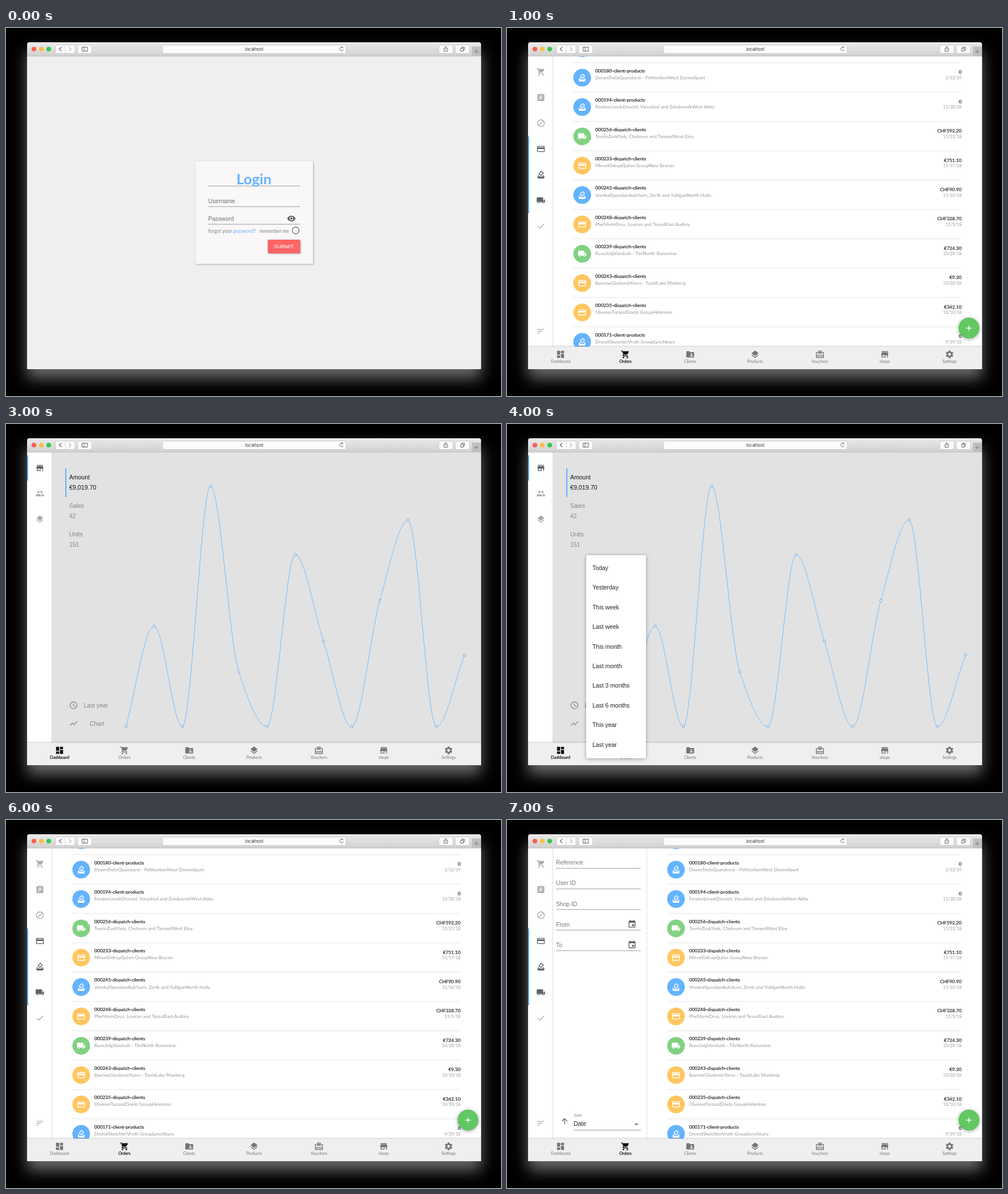
An HTML page for the animation above (8 s loop, 869x645 px).

```html
<!DOCTYPE html>
<html lang="en">
<head>
<meta charset="utf-8">
<title>Shop dashboard</title>
<style>
html, body { margin: 0; width: 100%; height: 100%; overflow: hidden; background: #000; }
#glow { position: absolute; left: 37px; top: 25px; width: 797px; height: 573px; border-radius: 4px 4px 1px 1px; box-shadow: 0 16px 26px rgba(255,255,255,.42); }
svg { position: absolute; left: 0; top: 0; }
text { font-family: "Liberation Sans", Arial, sans-serif; font-size: 10.4px; white-space: pre; }
.round { font-family: Lato, "Open Sans", sans-serif; }
.medium { stroke: currentColor; stroke-width: .2px; }
.ui { font-family: Inter, Roboto, sans-serif; }
.card { filter: drop-shadow(1px 1.5px 1.5px rgba(0,0,0,.3)); }
.panel { filter: drop-shadow(0 1.5px 3px rgba(0,0,0,.35)); }
.scene { visibility: hidden; animation: 8s step-end infinite; }
#login { animation-name: login; }
#orders { animation-name: orders; }
#pie { animation-name: pie; }
#chart { animation-name: chart; }
#menu { animation-name: menu; }
#shop { animation-name: shop; }
#filter { animation-name: filter; }
@keyframes login { 0% { visibility: visible } 12.5%, 100% { visibility: hidden } }
@keyframes orders { 0%, 25% { visibility: hidden } 12.5%, 75% { visibility: visible } 87.5%, 100% { visibility: hidden } }
@keyframes pie { 0% { visibility: hidden } 25% { visibility: visible } 37.5%, 100% { visibility: hidden } }
@keyframes chart { 0% { visibility: hidden } 37.5% { visibility: visible } 62.5%, 100% { visibility: hidden } }
@keyframes menu { 0% { visibility: hidden } 50% { visibility: visible } 62.5%, 100% { visibility: hidden } }
@keyframes shop { 0% { visibility: hidden } 62.5% { visibility: visible } 75%, 100% { visibility: hidden } }
@keyframes filter { 0% { visibility: hidden } 87.5%, 100% { visibility: visible } }
</style>
</head>
<body>
<div id="glow"></div>
<svg id="stage" width="100%" height="100%" viewBox="0 0 869 645"></svg>
<script>
const BLUE = '#64b3ff', GREEN = '#81d182', AMBER = '#ffc661';
const SHIFT = 165;

// Icons on a 24 unit grid: filled shapes and stroked lines
const solid = {
  store: 'M20 4H4v2h16zM21 14v-2l-1-5H4l-1 5v2h1v6h10v-6h4v6h2v-6zM12 18H6v-4h6z',
  people: 'M16 11a3 3 0 1 0-3-3 3 3 0 0 0 3 3zM8 11a3 3 0 1 0-3-3 3 3 0 0 0 3 3zM8 13c-2.3 0-7 1.2-7 3.5V19h14v-2.5C15 14.2 10.3 13 8 13zM16 13l-1 .1c1.2.8 2 1.9 2 3.4V19h6v-2.5c0-2.3-4.7-3.5-7-3.5z',
  layers: 'M12 18.5l-7.4-5.7L3 14.1l9 7 9-7-1.6-1.3zM12 16l9-7-9-7-9 7z',
  pie: 'M11 2v20a10 10 0 0 1 0-20zM13 2v9h9a10 10 0 0 0-9-9zM13 13v9a10 10 0 0 0 9-9z',
  dashboard: 'M3 13h8V3H3zM3 21h8v-6H3zM13 21h8V11h-8zM13 3v6h8V3z',
  cart: 'M7 18a2 2 0 1 0 .01 0zM17 18a2 2 0 1 0 .01 0zM1 2v2h2l3.6 7.6-1.4 2.4c-.7 1.3.3 3 1.8 3h12v-2H7.4c-.2 0-.3-.2-.2-.4l.9-1.6h7.5c.7 0 1.4-.4 1.7-1l3.6-6.5c.4-.7-.1-1.5-.9-1.5H5.2l-.9-2z',
  folder: 'M20 6h-8l-2-2H4a2 2 0 0 0-2 2v12a2 2 0 0 0 2 2h16a2 2 0 0 0 2-2V8a2 2 0 0 0-2-2zM15 9a2 2 0 1 1-.01 0zM19 17h-8v-1c0-1.3 2.7-2 4-2s4 .7 4 2z',
  clipboard: 'M19 3h-4.2a3 3 0 0 0-5.6 0H5a2 2 0 0 0-2 2v14a2 2 0 0 0 2 2h14a2 2 0 0 0 2-2V5a2 2 0 0 0-2-2zM12 3a1 1 0 1 1-.01 0zM14 17H7v-2h7zM17 13H7v-2h10zM17 9H7V7h10z',
  card: 'M20 4H4a2 2 0 0 0-2 2v12a2 2 0 0 0 2 2h16a2 2 0 0 0 2-2V6a2 2 0 0 0-2-2zM20 18H4v-6h16zM20 8H4V6h16z',
  vote: 'M18 13h-.7l-2 2h1.9l1.8 2H5l1.8-2h2l-2-2H6l-3 3v4a2 2 0 0 0 2 2h14a2 2 0 0 0 2-2v-4zM17 8l-5 4.9-3.5-3.5 5-5zM12.8 2.3L6.4 8.7a1 1 0 0 0 0 1.4l4.9 4.9a1 1 0 0 0 1.4 0l6.4-6.3a1 1 0 0 0 0-1.4l-5-5a1 1 0 0 0-1.3 0z',
  truck: 'M20 8h-3V4H3a2 2 0 0 0-2 2v11h2a3 3 0 0 0 6 0h6a3 3 0 0 0 6 0h2v-5zM6 15.5a1.5 1.5 0 1 1-.01 0zM19.5 9.5l2 2.5H17V9.5zM18 15.5a1.5 1.5 0 1 1-.01 0z',
  sort: 'M3 18h6v-2H3zM3 6v2h18V6zM3 13h12v-2H3z',
  date: 'M17 12h-5v5h5zM16 1v2H8V1H6v2H5a2 2 0 0 0-2 2v14a2 2 0 0 0 2 2h14a2 2 0 0 0 2-2V5a2 2 0 0 0-2-2h-1V1zM19 19H5V8h14z',
  eye: 'M12 4.5C7 4.5 2.7 7.6 1 12c1.7 4.4 6 7.5 11 7.5s9.3-3.1 11-7.5c-1.7-4.4-6-7.5-11-7.5zM12 7a5 5 0 1 1-.01 0zM12 9a3 3 0 1 0 .01 0z',
  gear: gear()
};
const lines = {
  clock: 'M12 3a9 9 0 1 0 .01 0M11.8 7v5.6l4.7 2.8',
  trend: 'M2.7 17.7l6.8-6.8 4 4 7.8-8.7',
  gift: 'M3 7h18v13H3zM3 15.7h18M12 7.5l4 4M12 7.5l-4 4M9.5 7A2 2 0 1 1 12 5a2 2 0 1 1 2.5 2',
  block: 'M12 3a9 9 0 1 0 .01 0M18 6L6 18',
  check: 'M4 12.7l5 5L20.3 6.3',
  up: 'M12 20V5M5 12l7-7 7 7',
  plus: 'M12 5v14M5 12h14'
};

function gear() {
  const pts = [];
  for (let i = 0; i < 6; i++)
    for (const [off, r] of [[-22, 7.3], [-13, 10], [13, 10], [22, 7.3]]) {
      const a = (i * 60 + off) * Math.PI / 180;
      pts.push((12 + r * Math.sin(a)).toFixed(2) + ' ' + (12 - r * Math.cos(a)).toFixed(2));
    }
  return 'M' + pts.join('L') + 'zM12 8.5a3.5 3.5 0 1 0 .01 0z';
}

const rect = (x, y, w, h, fill, more = '') => `<rect x="${x}" y="${y}" width="${w}" height="${h}" fill="${fill}" ${more}/>`;
const disc = (x, y, r, fill, more = '') => `<circle cx="${x}" cy="${y}" r="${r}" fill="${fill}" ${more}/>`;
const path = (d, stroke, width = 1, more = '') => `<path d="${d}" fill="none" stroke="${stroke}" stroke-width="${width}" ${more}/>`;
const rule = (x1, x2, y, color = '#9b9b9b') => path(`M${x1} ${y}H${x2}`, color);
const group = (x, body) => `<g transform="translate(${x})">${body}</g>`;
const scene = (id, body) => `<g id="${id}" class="scene" clip-path="url(#page)">${body}</g>`;

function text(x, y, str, fill, { size = 10.4, cls = '', anchor = 'start', weight = 400 } = {}) {
  return `<text x="${x}" y="${y}" fill="${fill}" color="${fill}" class="${cls}" text-anchor="${anchor}" style="font-size:${size}px;font-weight:${weight}">${str}</text>`;
}

function icon(name, x, y, color, size = 16) {
  const k = size / 24;
  const body = solid[name]
    ? `<path d="${solid[name]}" fill="${color}" fill-rule="evenodd"/>`
    : path(lines[name], color, 2);
  return `<g transform="translate(${x - size / 2} ${y - size / 2}) scale(${k})">${body}</g>`;
}

function nav(active) {
  const items = [['dashboard', 'Dashboard'], ['cart', 'Orders'], ['folder', 'Clients'], ['layers', 'Products'],
    ['gift', 'Vouchers'], ['store', 'shops'], ['gear', 'Settings']];
  return rect(37, 556, 797, 3, 'url(#edge)') + rect(37, 558.5, 797, 40, '#efefef') +
    items.map(([name, label], i) => {
      const x = 94 + i * 113.83, on = i === active, color = on ? '#111' : '#757575';
      return icon(name, x, 572, color, 16.5) +
        text(x, 586.6, label, color, { size: 7.1, cls: on ? 'round medium' : 'round', anchor: 'middle' });
    }).join('');
}

function sidebar(icons, activeFrom, activeTo, barY, barH) {
  return rect(37, 49, 43.5, 510, '#fff') + rect(80, 49, 1, 510, '#dedede') + rect(37, barY, 2, barH, BLUE) +
    icons.map((n, i) => icon(n, 59.5, 77 + i * 45, i >= activeFrom && i <= activeTo ? '#606060' : '#acacac')).join('');
}

// Monotone cubic through evenly spaced values; heights rise from the base line
function curve(x0, heights) {
  const n = heights.length, step = (805 - x0) / (n - 1);
  const pts = heights.map((h, i) => [x0 + i * step, 530.3 - h]);
  const d = pts.slice(1).map((p, i) => p[1] - pts[i][1]);
  const m = pts.map((_, i) => {
    if (i === 0) return d[0];
    if (i === n - 1) return d[n - 2];
    const a = d[i - 1], b = d[i];
    return a * b <= 0 ? 0 : 2 * a * b / (a + b);
  });
  let p = 'M' + pts[0];
  for (let i = 1; i < n; i++) {
    const [xa, ya] = pts[i - 1], [xb, yb] = pts[i];
    p += `C${xa + step / 3} ${ya + m[i - 1] / 3} ${xb - step / 3} ${yb - m[i] / 3} ${xb} ${yb}`;
  }
  return path(p, '#7abcfb') + pts.map(([x, y]) => disc(x, y, 2, '#fff', 'stroke="#559fe3"')).join('');
}

const months = [0, 176, 0, 421.5, 96, 0, 301, 149.5, 0, 221, 362, 0, 125.5];
const shopMonths = [0, 0, 0, 148, 26, 0, 311, 274, 0, 402, 347, 0, 0];

function pieChart(values, cx, cy, r) {
  const sum = values.reduce((a, b) => a + b);
  let angle = 0, spokes = '';
  for (const v of values.filter(Boolean)) {
    spokes += `M${cx} ${cy}L${cx + r * Math.cos(angle)} ${cy + r * Math.sin(angle)}`;
    angle -= v / sum * 2 * Math.PI;
  }
  return disc(cx, cy, r, BLUE, 'stroke="#fff"') + path(spokes, '#fff');
}

function stats(amount, sales, units, kind) {
  const grey = '#858585';
  return rect(104, 78, 2, 50, BLUE) +
    text(111, 97, 'Amount', '#161616') + text(111, 115, amount, '#161616', { size: 10.7 }) +
    text(111, 147, 'Sales', grey) + text(111, 165, sales, grey) +
    text(111, 197, 'Units', grey) + text(111, 215, units, grey) +
    icon('clock', 118.5, 493, '#8f8f8f') + text(136.5, 496.5, 'Last year', grey) +
    icon(kind === 'Pie' ? 'pie' : 'trend', 118.5, 525, '#8f8f8f') + text(147, 528.5, kind, grey);
}

const dashboard = body => rect(37, 49, 797, 549, '#e2e2e2') +
  sidebar(['store', 'people', 'layers'], 0, 0, 55, 44) + body + nav(0);

const tooltip = `<g class="panel">${rect(560, 389, 60.5, 33, '#fff', 'rx="2"')}</g>` +
  text(565, 403, 'November', BLUE, { size: 10.5, cls: 'round', weight: 700 }) +
  text(565, 416, '€1,762.90', '#222', { size: 9.7, cls: 'round medium' });

function shopList() {
  const shops = [[70, '#999', ['Vorle Inc']], [112, '#222', ['Tolve, Harno and', 'Quib']], [162, '#999', ['Zeph, Orvin and', 'Mulgra']]];
  return rect(81, 49, 164, 510, '#fff') + rect(88, 87, 2, 50, BLUE) +
    shops.map(([y, color, names], i) => icon('store', 102.5, y, i === 1 ? '#666' : '#b5b5b5') +
      names.map((s, j) => text(130.5, (i ? y - 6 : y + 4) + j * 18, s, color, { size: 10.5 })).join('')).join('');
}

const periods = ['Today', 'Yesterday', 'This week', 'Last week', 'This month', 'Last month', 'Last 3 months', 'Last 6 months', 'This year', 'Last year'];
const periodMenu = `<g class="panel">${rect(139, 230, 105, 356, '#fff', 'rx="2"')}</g>` +
  periods.map((s, i) => text(150, 256 + i * 34.4, s, '#222')).join('');

const rows = [
  ['vote', '000180-client-products', 'DovenTrelisQuandorst - PelthorbenWest Donnellport', '0', '1/12/19'],
  ['vote', '000194-client-products', 'FendorLivaskDrovtel, Varushiol and ZelubavnikWest Abby', '0', '11/30/18'],
  ['truck', '000256-dispatch-clients', 'TovrinZuskYask, Chelvurn and TampolWest Eloy', 'CHF592.20', '11/21/18'],
  ['card', '000233-dispatch-clients', 'MirvelOdrupQuhm GroupNew Brycen', '€751.10', '11/17/18'],
  ['vote', '000245-dispatch-clients', 'VrenkalSpovdanAulchurn, Zertk and YuhlganNorth Holly', 'CHF90.90', '11/16/18'],
  ['card', '000248-dispatch-clients', 'PhelVormDrus, Loviran and TessulEast Audrey', 'CHF328.70', '11/5/18'],
  ['truck', '000239-dispatch-clients', 'RuveJolgVandush - TilvNorth Ilianaview', '€724.30', '10/24/18'],
  ['card', '000243-dispatch-clients', 'BavrineGlodemicYorvs - TauldLake Maeberg', '€9.30', '10/20/18'],
  ['card', '000235-dispatch-clients', 'OlvenerTurazolDoelp GroupHelenton', '€342.10', '10/10/18'],
  ['vote', '000171-client-products', 'DromilSkeichlerVruth GroupLynchbury', '0', '9/29/18']
];
const tint = { vote: BLUE, truck: GREEN, card: AMBER };

function ordersPage(dx, extra = '') {
  const list = rows.map(([kind, ref, who, sum, date], i) => {
    const y = i * 51.45;
    return rule(116 + dx, 798, 60.8 + y, '#e6e6e6') + disc(132 + dx, 87 + y, 15.5, tint[kind]) +
      icon(kind, 132 + dx, 87 + y, '#fff') +
      text(155 + dx, 77.6 + y, ref, '#222', { size: 8.35, cls: 'round medium' }) +
      text(155 + dx, 89.7 + y, who, '#979797', { size: 8.3, cls: 'round' }) +
      text(798, 80.2 + y, sum, '#222', { size: 8.3, cls: 'round medium', anchor: 'end' }) +
      text(798, 89.7 + y, date, '#979797', { size: 7.4, cls: 'round', anchor: 'end' });
  }).join('');
  return rect(37, 49, 797, 549, '#fff') +
    sidebar(['cart', 'clipboard', 'block', 'card', 'vote', 'truck', 'check'], 3, 5, 190, 135) +
    icon('sort', 59.5, 531.5, '#acacac') + extra + disc(132 + dx, 35.6, 15.5, BLUE) + list +
    `<g class="panel">${disc(811, 526, 18.3, '#61c864')}</g>` + icon('plus', 811, 526, '#fff') + nav(1);
}

function filterForm() {
  const fields = ['Reference', 'User ID', 'Shop ID', 'From', 'To'].map((s, i) => {
    const y = i * 36.1;
    return text(86, 78.3 + y, s, '#777', { size: 10.3 }) + rule(86, 235, 84.7 + y) +
      (i > 2 ? icon('date', 219.5, 74.3 + y, '#606060') : '');
  }).join('');
  return rect(245, 49, 1, 510, '#e0e0e0') + fields + icon('up', 101, 528, '#606060') +
    text(117, 520.3, 'Sort', '#808080', { size: 7.6 }) + text(117, 536.3, 'Date', '#222') +
    rule(117, 235, 543.5) + '<path d="M223.7 532h7l-3.5 3.5z" fill="#757575"/>';
}

function loginPage() {
  const small = { size: 8.5, cls: 'round' };
  return rect(37, 49, 797, 549, '#efefef') +
    `<g class="card">${rect(333, 233.5, 206, 180, '#f9f7f8', 'rx="1.5"')}</g>` +
    rule(355, 516, 277) + text(435.3, 274, 'Login', BLUE, { size: 25.5, cls: 'round', weight: 700, anchor: 'middle' }) +
    text(355, 306.6, 'Username', '#707070', { size: 10.25 }) + rule(355, 516, 313) +
    text(355, 337.6, 'Password', '#707070', { size: 10.25 }) + rule(355, 516, 344) + icon('eye', 501, 334, '#606060') +
    text(355, 358.6, `forgot your <tspan fill="${BLUE}">password</tspan>?`, '#858585', small) +
    text(497, 358.6, 'remember me', '#858585', { ...small, anchor: 'end' }) +
    disc(508.5, 354.8, 6, 'none', 'stroke="#777" stroke-width="1.4"') +
    `<g class="card">${rect(459.5, 371, 57, 24, '#ff6466', 'rx="2"')}</g>` +
    text(487.7, 386, 'SUBMIT', '#fff', { size: 9.3, anchor: 'middle' });
}

function browserBar() {
  const button = (x, w) => rect(x, 30, w, 14.5, '#fbfbfb', 'rx="2.5" stroke="#c6c6c6" stroke-width=".7"');
  const ink = '#555';
  return '<path d="M37 49.5V29a4 4 0 0 1 4-4H830a4 4 0 0 1 4 4V49.5z" fill="url(#bar)"/>' + rect(37, 48.6, 797, .9, '#bcbcbc') +
    ['#fc5c57', '#fdbd40', '#35c84b'].map((c, i) => disc(49 + i * 13, 37, 4.1, c)).join('') +
    button(87, 34) + path('M104 30v14.5', '#c6c6c6', .7) +
    path('M97 33.5l-3.5 3.6 3.5 3.6', ink, 1.1) + path('M110.5 33.5l3.5 3.6-3.5 3.6', '#aaa', 1.1) +
    button(126, 24.5) + path('M133.5 33.5h9.5v7h-9.5zM137 33.5v7', ink, .9) +
    button(275, 322) + text(436, 40, 'localhost', '#333', { size: 7.5, cls: 'ui', anchor: 'middle' }) +
    path('M592 35a3.3 3.3 0 1 0 .3 2.8M589 32l2.3 2-2.3 1.8', '#666', .9) +
    button(760, 24.5) + path('M770.3 35.5H769v5.5h6v-5.5h-1.3M772 38.5v-6M770 34.3l2-2 2 2', ink, .9) +
    button(789, 24.5) + path('M798.3 35.5h4.5v5h-4.5zM800 35.3v-1.8h4.7v5h-1.8', ink, .9) +
    rect(818, 32.5, 16, 16.5, '#bfbfbf') + path('M825.7 37.5v7.5M822 41.2h7.5', '#777', .9);
}

const gradient = (id, from, to) =>
  `<linearGradient id="${id}" x2="0" y2="1"><stop stop-color="${from}"/><stop offset="1" stop-color="${to}"/></linearGradient>`;

document.getElementById('stage').innerHTML =
  `<defs>${gradient('bar', '#eaeaea', '#d0d0d0')}${gradient('edge', 'rgba(0,0,0,0)', 'rgba(0,0,0,.2)')}` +
  `<clipPath id="page">${rect(37, 49, 797, 549, '#fff', 'rx="1"')}</clipPath></defs>` +
  scene('login', loginPage()) +
  scene('orders', ordersPage(0)) +
  scene('pie', dashboard(stats('€9,019.70', 42, 151, 'Pie') + pieChart(months, 508, 304.2, 180.7) + tooltip)) +
  scene('chart', dashboard(stats('€9,019.70', 42, 151, 'Chart') + curve(210.5, months))) +
  scene('menu', periodMenu) +
  scene('shop', dashboard(shopList() + group(SHIFT - .3, stats('€4,003.20', 20, 74, 'Chart')) + curve(375.3, shopMonths))) +
  scene('filter', ordersPage(SHIFT - .3, filterForm())) +
  browserBar();
</script>
</body>
</html>
```
